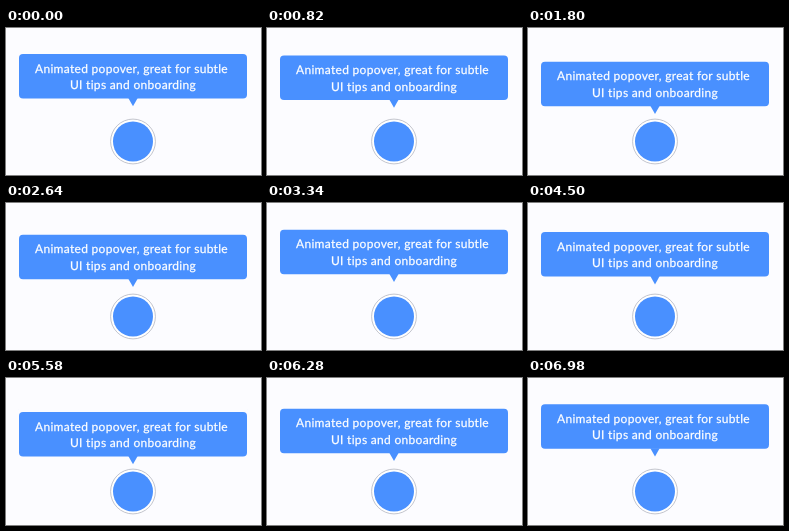
These frames come from a looping animation (255 px wide and 147 px high, 7.08 s). An HTML page:

```html
<!DOCTYPE html>
<html lang="en">
<head>
<meta charset="utf-8">
<title>Popover</title>
<style>
  html, body { margin: 0; width: 100%; height: 100%; overflow: hidden; background: #fcfcff; }
  svg { display: block; width: 255px; height: 147px; }
  text {
    font: 400 12px Lato, "Open Sans", sans-serif; letter-spacing: .3px; text-anchor: middle;
    fill: #fff; stroke: #fff; stroke-width: .25px; text-rendering: geometricPrecision;
  }
</style>
</head>
<body>
<svg viewBox="0 0 255 147">
  <circle cx="127" cy="113.5" r="22.4" fill="#fff" stroke="#a9adb8" stroke-width=".7"/>
  <circle cx="127" cy="113.5" r="20" fill="#4990ff"/>
  <g id="popover">
    <rect x="13" width="228" height="44.5" rx="4" fill="#4990ff"/>
    <path d="M122.3 44h9.4L127 52.3z" fill="#4990ff"/>
    <text x="125.5" y="18.7">Animated popover, great for subtle</text>
    <text x="127" y="35.2">UI tips and onboarding</text>
  </g>
</svg>
<script>
  const LOOP = 7080, STEPS = 150, BOB = 75;
  const popover = document.getElementById('popover');

  // Steps come in threes, held for 20, 100 and 20 ms.
  function stepAt(time) {
    const rest = time % 140;
    const part = rest < 20 ? 0 : rest < 120 ? 1 : 2;
    return Math.min(STEPS - 1, 3 * Math.floor(time / 140) + part);
  }

  function draw() {
    const step = stepAt(performance.now() % LOOP);
    const y = 29.8 - 4.2 * Math.cos(2 * Math.PI * (step - 5.2) / BOB);
    popover.setAttribute('transform', `translate(0 ${y.toFixed(2)})`);
    requestAnimationFrame(draw);
  }
  draw();
</script>
</body>
</html>
```
